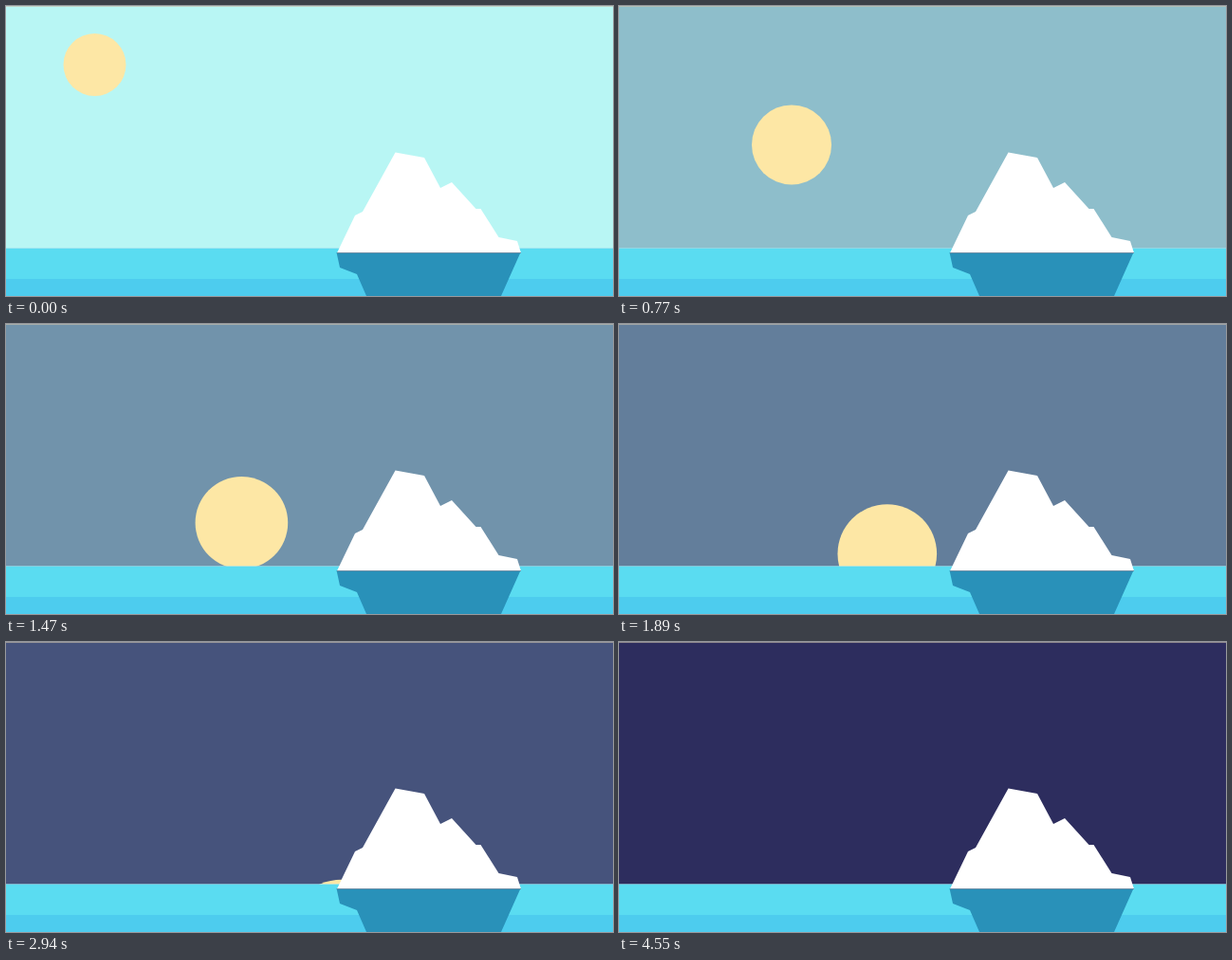
An HTML page that plays this animation: 640 px wide and 306 px high, repeating every 4.62 s.

```html
<!DOCTYPE html>
<html lang="en">
<head>
<meta charset="utf-8">
<title>Iceberg at dusk</title>
<style>
html, body { margin: 0; width: 100%; height: 100%; overflow: hidden; }
svg { display: block; width: 100%; height: 100%; }
</style>
</head>
<body>
<svg viewBox="0 0 640 306">
  <rect id="sky" width="640" height="306"/>
  <circle id="sun" fill="#fde7a5"/>
  <rect width="640" height="1" fill="#c8beaa" opacity=".6"/>
  <rect y="255" width="640" height="1" fill="#96e1f0" opacity=".7"/>
  <rect y="256" width="640" height="32" fill="#5adcf1"/>
  <rect y="288" width="640" height="18" fill="#4dccee"/>
  <path fill="#2991b9" d="M348.5 260L352 276 370 283 380 306H522L542.5 260Z"/>
  <path fill="#fff" d="M349 260.5L368 221 376 217 410.5 154.5 441 160 458 192 470 186 495.500 214H500.500L519.500 244 539 248 543 260.500Z"/>
  <rect x="349" y="260" width="194" height="1" fill="#6b8fa6"/>
</svg>
<script>
const LOOP = 4620, STEP = 70, TAU = 3830;
const sky = document.getElementById('sky');
const sun = document.getElementById('sun');

// Sky colours by time in ms
const tones = [
  [0, 184, 246, 244], [490, 156, 211, 218], [1050, 129, 171, 189],
  [1890, 99, 126, 155], [2450, 83, 102, 139], [3640, 54, 59, 105],
  [4550, 45, 45, 94]
];

const ease = t => 1 - Math.exp(-t / TAU);

function skyAt(t) {
  const i = Math.max(1, tones.findIndex(k => k[0] >= t));
  const a = tones[i - 1], b = tones[i];
  const u = (ease(t) - ease(a[0])) / (ease(b[0]) - ease(a[0]));
  const rgb = [1, 2, 3].map(c => Math.round(a[c] + (b[c] - a[c]) * u));
  return `rgb(${rgb})`;
}

function draw(now) {
  const t = Math.floor(now % LOOP / STEP) * STEP;
  const e = ease(t);
  sky.setAttribute('fill', skyAt(t));
  sun.setAttribute('cx', 93.5 + 486 * e);
  sun.setAttribute('cy', 62 + 463.6 * e);
  sun.setAttribute('r', 33 + 49.6 * e);
}

let start;
function tick(now) {
  start ??= now;
  draw(now - start);
  requestAnimationFrame(tick);
}
draw(0);
requestAnimationFrame(tick);
</script>
</body>
</html>
```
